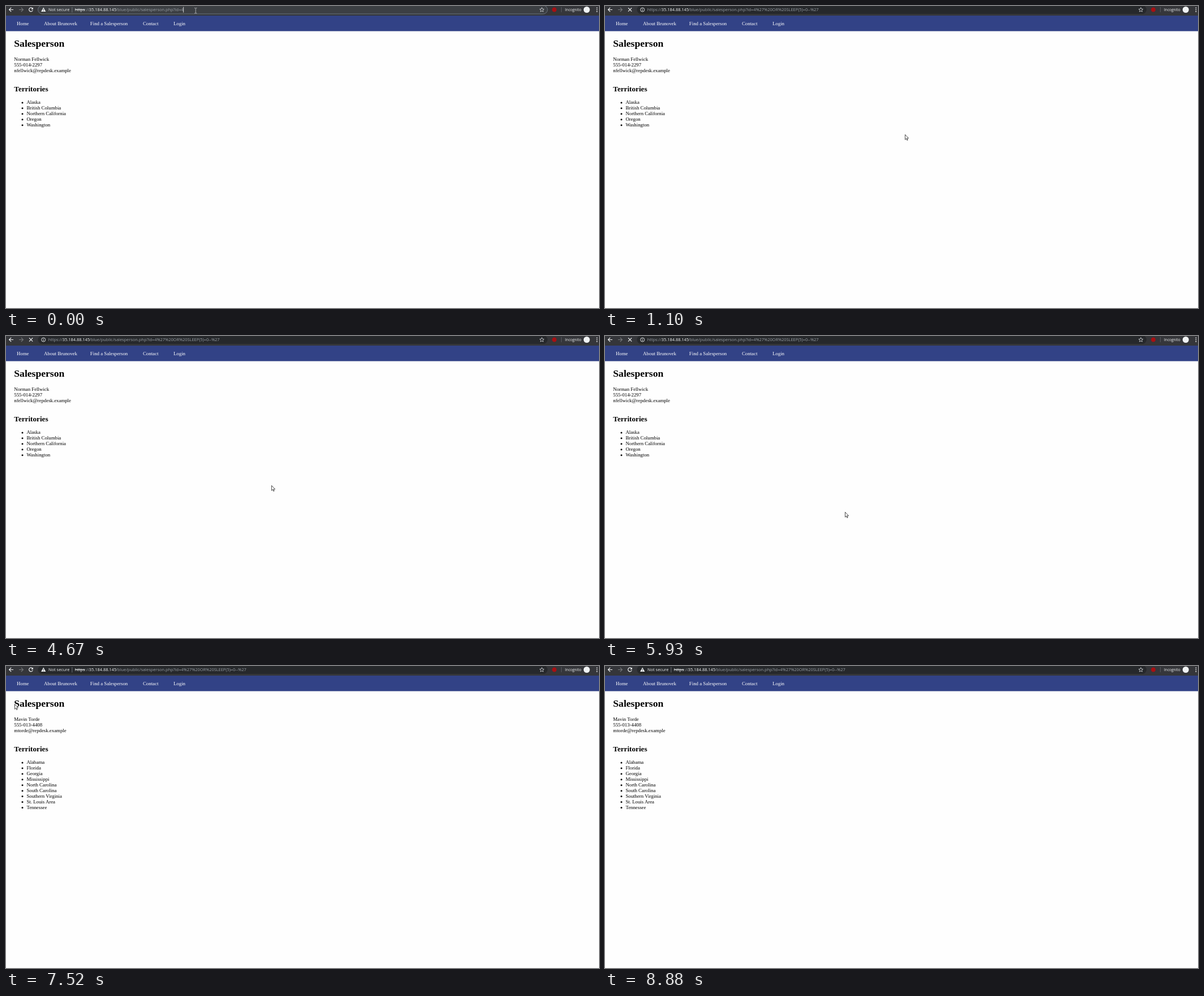
These frames come from a looping animation (1048 px wide and 534 px high, 9.15 s). An HTML page:

```html
<!DOCTYPE html>
<html lang="en">
<head>
<meta charset="utf-8">
<title>Salesperson</title>
<style>
  html, body { margin: 0; width: 100%; height: 100%; overflow: hidden; background: #fefefe; }
  svg { display: block; width: 1048px; height: 534px; }
  text { white-space: pre; }
  .page { font: 8.8px "Liberation Serif", "Times New Roman", serif; fill: #000; }
  .page .h1 { font-size: 17.6px; font-weight: bold; }
  .page .h2 { font-size: 13.2px; font-weight: bold; }
  .nav { fill: #fff; }
  .ui { font: 7.42px "Open Sans", "Noto Sans", sans-serif; fill: #9aa0a6; }
  .ui .lit { fill: #f1f3f4; }
  .ui .bold { font-weight: bold; }
  .ui .link { font-weight: bold; fill: #2f88e8; }
  .ui .small { font-size: 6.6px; }
  .struck { text-decoration: line-through; }
  .line { fill: none; stroke: #f1f3f4; stroke-width: 1.2; }
  .off { display: none; }
</style>
</head>
<body>
<svg viewBox="0 0 1048 534">
  <defs>
    <filter id="shade" x="-5%" y="-20%" width="110%" height="160%">
      <feDropShadow dx="0" dy="2" stdDeviation="2.2" flood-opacity=".45"/>
    </filter>
    <g id="globe">
      <circle r="3.8" fill="#dadce0"/>
      <path d="M-2.8-1.4 -.6.6V3M.4-3.3 -.4-1.5 1.6-.4 1.2 1.2 2.6 1.8" fill="none" stroke="#3c4043" stroke-width="1"/>
    </g>
  </defs>

  <g class="page">
    <rect y="17" width="1048" height="27.5" fill="#324286"/>
    <g class="nav">
      <text x="19" y="34.4">Home</text>
      <text x="67" y="34.4">About Brunovek</text>
      <text x="148.8" y="34.4">Find a Salesperson</text>
      <text x="242" y="34.4">Contact</text>
      <text x="296" y="34.4">Login</text>
    </g>
    <text class="h1" x="14.3" y="72.4">Salesperson</text>
    <text class="h2" x="14.3" y="151.2">Territories</text>
    <g id="before"></g>
    <g id="after"></g>
  </g>

  <g class="ui">
    <rect width="1048" height="17" fill="#35363a"/>
    <path class="line" d="M13 6.5H5.6M9.2 2.9 5.6 6.5 9.2 10.1"/>
    <path class="line" d="M23 6.5H30.4M26.8 2.9 30.4 6.5 26.8 10.1" style="stroke:#77797c"/>
    <g id="reload">
      <path class="line" d="M46.6 4.1A3.4 3.4 0 1 0 47.3 7.4"/>
      <path d="M47.9 2.4V6H44.3Z" fill="#f1f3f4"/>
    </g>
    <path id="stop" class="line" d="M41 3.4 47.2 9.6M47.2 3.4 41 9.6"/>

    <rect id="pill" x="56.5" y="-1" width="900.5" height="15" rx="7.5" fill="#26282b"/>
    <path d="M947 2.7 948.1 5.3 950.9 5.5 948.8 7.4 949.4 10.1 947 8.7 944.6 10.1 945.2 7.4 943.1 5.5 945.9 5.3Z" fill="none" stroke="#dadce0" stroke-width=".8"/>
    <circle cx="969" cy="6.5" r="3.9" fill="#a80f12"/>
    <path d="M981.5 2V11" stroke="#5f6368" stroke-width=".8"/>
    <text class="lit small" x="988" y="9">Incognito</text>
    <circle cx="1026.3" cy="6.5" r="5.5" fill="#f1f3f4"/>
    <g fill="#f1f3f4">
      <circle cx="1044.4" cy="3.4" r=".95"/><circle cx="1044.4" cy="6.6" r=".95"/><circle cx="1044.4" cy="9.8" r=".95"/>
    </g>

    <g id="insecure">
      <path d="M66.2 2.6 70.3 10H62.1Z" fill="#f1f3f4"/>
      <path d="M66.2 5V7.4M66.2 8.1V9.1" stroke="#303236" stroke-width=".9"/>
      <text class="lit" x="75" y="9.3">Not secure</text>
      <path d="M116.8 2V11.5" stroke="#80868b" stroke-width=".8"/>
      <text class="lit struck" x="121.8" y="9.3">https</text>
      <text x="140" y="9.3">://</text>
      <text class="lit" x="146.8" y="9.3">35.184.88.145</text>
      <text id="path" x="194.3" y="9.3"></text>
    </g>
    <path id="caret" d="M313.6 1.6V11.6" stroke="#f1f3f4" stroke-width=".8"/>

    <g id="loading">
      <circle cx="66.2" cy="6.6" r="3.5" class="line" style="stroke-width:.9"/>
      <path d="M66.2 4.4V5.4M66.2 6.1V8.8" stroke="#f1f3f4" stroke-width=".9"/>
      <text x="74.8" y="9.3">https://</text>
      <text class="lit" x="99.8" y="9.3">35.184.88.145</text>
      <text x="147.2" y="9.3">/blue/public/salesperson.php?id=4%27%20OR%20SLEEP(5)=0--%27</text>
    </g>

    <g id="popup">
      <path d="M53 -5H960V54Q960 58.5 955.5 58.5H57.5Q53 58.5 53 54Z" fill="#3a3c40" filter="url(#shade)"/>
      <rect x="53" y="17" width="907" height="20.7" fill="#4a4c50"/>
      <use href="#globe" x="66.2" y="6.6"/>
      <use href="#globe" x="66.2" y="27.2"/>
      <circle cx="65.4" cy="47" r="2.2" fill="none" stroke="#bdc1c6" stroke-width=".9"/>
      <path d="M67 48.6 69.6 51.2" stroke="#bdc1c6" stroke-width="1"/>
      <text x="81" y="9.3">https://</text>
      <text class="lit" x="106" y="9.3">35.184.88.145</text>
      <text x="153.4" y="9.3">/blue/public/salesperson.php?id=4' OR SLEEP(5)=0--'</text>
      <text class="link" x="81" y="29.9">https://35.184.88.145/blue/public/salesperson.php?id=4%27 OR SLEEP(5)=0--%27</text>
      <text class="lit" x="81" y="50.7">https://35.184.88.145/blue/public/salesperson.php?id=4'</text>
      <text class="lit bold" x="275.6" y="50.7">OR SLEEP(5)=0--'</text>
      <text x="341" y="50.7" style="fill:#bdc1c6">- Fomdra Search</text>
    </g>
  </g>

  <path id="beam" d="M333 3.6H334.5L335.2 4.3 335.9 3.6H337.4M335.2 4.3V12.2M333 12.9H334.5L335.2 12.2 335.9 12.9H337.4" fill="none" stroke="#c8cacc" stroke-width=".8"/>
  <path id="arrow" d="M.4.4V9.3L2.4 7.4 3.8 10.5 5.1 9.9 3.7 6.9H6.5Z" fill="#fff" stroke="#111" stroke-width=".75"/>
</svg>

<script>
const LOOP = 9150, POPUP = 430, SUBMIT = 830, LOADED = 6190, GONE = 8880;
const QUERY = "/blue/public/salesperson.php?id=4";
const $ = id => document.getElementById(id);

function fillPerson(id, contact, places) {
  const text = (x, y, s) => `<text x="${x}" y="${y}">${s}</text>`;
  $(id).innerHTML =
    contact.map((s, i) => text(14.3, 96.8 + i * 10, s)).join("") +
    places.map((s, i) => `<circle cx="29" cy="${170.9 + i * 9.95}" r="1.5"/>` +
      text(36.4, 173.3 + i * 9.95, s)).join("");
}

fillPerson("before",
  ["Norman Fellwick", "555-014-2297", "nfellwick@repdesk.example"],
  ["Alaska", "British Columbia", "Northern California", "Oregon", "Washington"]);
fillPerson("after",
  ["Mavin Torde", "555-013-4408", "mtorde@repdesk.example"],
  ["Alabama", "Florida", "Georgia", "Mississippi", "North Carolina",
   "South Carolina", "Southern Virginia", "St. Louis Area", "Tennessee"]);

// The pointer jumps at evenly spaced moments within each burst: start, end, steps
const ticks = [
  [830, 1100, 3], [1400, 1670, 3], [3350, 4280, 8], [4400, 5390, 8],
  [5510, 6470, 8], [6590, 7520, 8], [7640, 8610, 8], [8760, 8880, 2]
].flatMap(([a, b, n]) => Array.from({ length: n }, (_, i) => a + (b - a) * i / (n - 1)));

// Pointer path: time, x, y
const keys = [
  [830, 400, 62], [1100, 530, 227], [1400, 529, 224], [1670, 527, 220], [3350, 527, 220],
  [3620, 420, 188], [3880, 235, 196], [4280, 345, 234], [4530, 468, 262], [4820, 410, 345],
  [5110, 284, 322], [5390, 360, 290], [5650, 476, 306], [5921, 424, 311], [6200, 372, 258],
  [6470, 354, 212], [6860, 190, 150], [7250, 40, 88], [7520, 15, 67], [7640, 22, 58],
  [8060, 270, 165], [8610, 716, 406], [8760, 947, 505]
];

function pointerAt(t) {
  const last = keys.length - 1;
  let i = keys.findIndex(k => k[0] > t) - 1;
  if (i < 0) return keys[last];
  const p = n => keys[Math.max(0, Math.min(last, n))];
  const [a, b, c, d] = [p(i - 1), p(i), p(i + 1), p(i + 2)];
  const span = c[0] - b[0], u = (t - b[0]) / span;
  // Time-aware Hermite spline
  return [0, 1, 2].map(k => {
    const m0 = (c[k] - a[k]) / (c[0] - a[0]) * span;
    const m1 = (d[k] - b[k]) / (d[0] - b[0]) * span;
    return (2 * u ** 3 - 3 * u * u + 1) * b[k] + (u ** 3 - 2 * u * u + u) * m0 +
           (3 * u * u - 2 * u ** 3) * c[k] + (u ** 3 - u * u) * m1;
  });
}

const show = (id, on) => $(id).classList.toggle("off", !on);

function draw(t) {
  const idle = t < POPUP, loading = t >= SUBMIT && t < LOADED, done = t >= LOADED;
  show("before", !done);
  show("after", done);
  show("reload", !loading);
  show("stop", loading);
  show("loading", loading);
  show("insecure", idle || done);
  show("caret", idle);
  show("popup", t >= POPUP && t < SUBMIT);
  show("beam", t < SUBMIT);
  show("arrow", t >= SUBMIT && t < GONE);
  $("path").textContent = QUERY + (done ? "%27%20OR%20SLEEP(5)=0--%27" : "");
  $("pill").style.fill = idle ? "#3c3f43" : "#26282b";
  $("pill").style.stroke = idle ? "#6b7480" : "none";

  if (t >= SUBMIT) {
    const [, x, y] = pointerAt(ticks.findLast(k => k <= t + .01));
    $("arrow").setAttribute("transform", `translate(${Math.round(x)} ${Math.round(y)})`);
  }
}

const start = performance.now();
function frame() {
  draw((performance.now() - start) % LOOP);
  requestAnimationFrame(frame);
}
frame();
</script>
</body>
</html>
```
